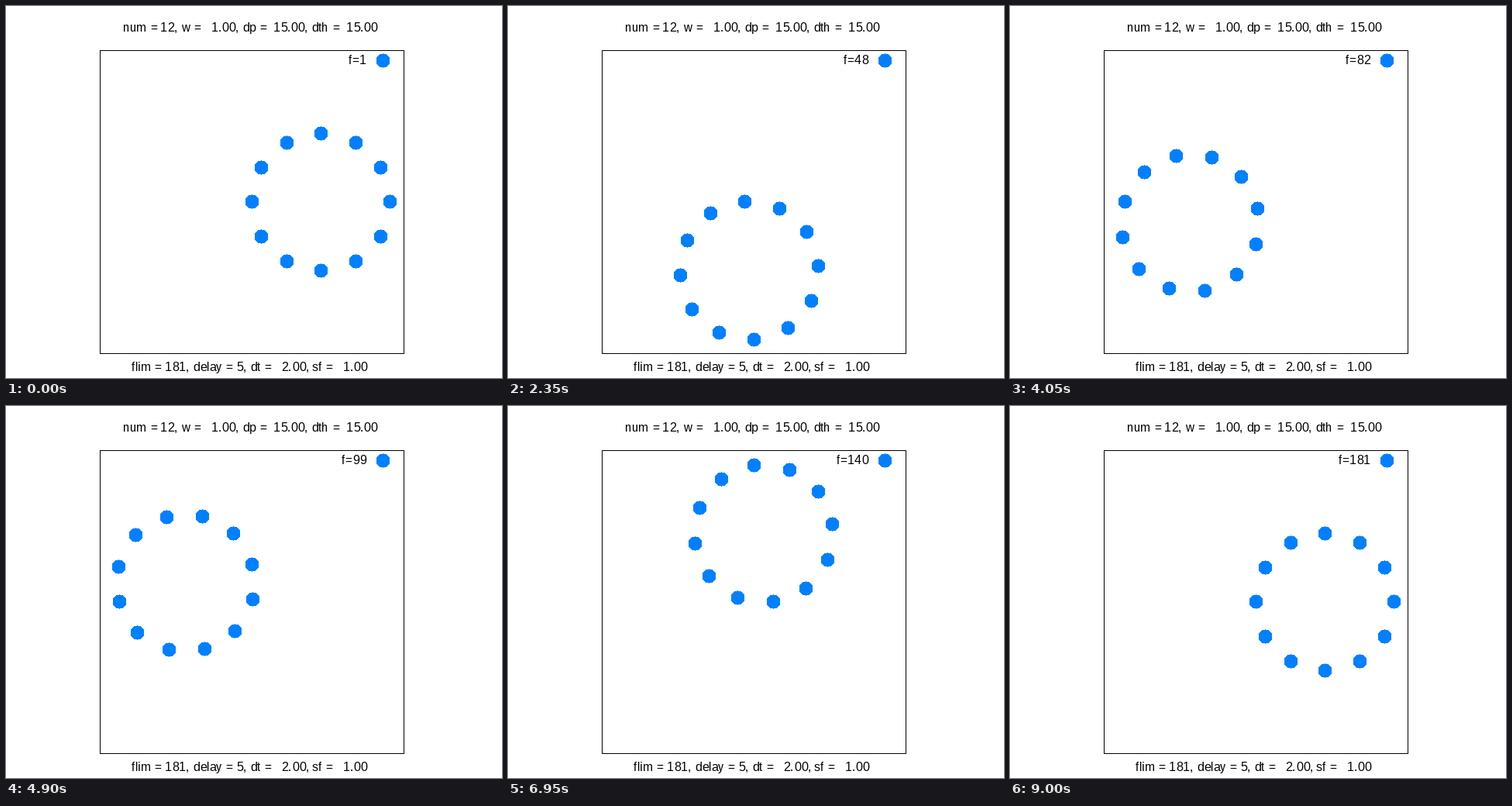
A matplotlib script that plays this animation: 640x480 px, repeating every 9.05 s.

```python
import math

import numpy as np
import matplotlib.pyplot as plt
from matplotlib.animation import FuncAnimation
from matplotlib.collections import PolyCollection
from matplotlib.patches import Rectangle
from matplotlib.textpath import text_to_path

W, H, DPI = 640, 480, 100
FRAMES, DELAY = 181, 50
NUM, STEP = 12, 2.0
BLUE = "#0080ff"
FONT_PX = 16
LEFT, TOP, RIGHT, BOTTOM = 121, 57, 513, 448
SPAN = 4.4  # data units across the box
TEXT_RIGHT = 464.5

# crisp, fully hinted glyphs
plt.rcParams["text.hinting"] = "default"
plt.rcParams["text.hinting_factor"] = 1

fig = plt.figure(figsize=(W / DPI, H / DPI), dpi=DPI, facecolor="white")
ax = fig.add_axes([0, 0, 1, 1])
ax.set_xlim(0, W)
ax.set_ylim(H, 0)
ax.axis("off")


def disc_outline(r=9):
    """Stair-stepped outline of a small aliased disc around pixel (0, 0)."""
    right, left = [], []
    for row in range(-r, r + 1):
        half = min(r - 1, math.isqrt(r * r - row * row))
        right += [(half + 1, row), (half + 1, row + 1)]
        left += [(-half, row), (-half, row + 1)]
    return np.array(right + left[::-1], float)


def glyph(baseline, char=""):
    return ax.text(0, baseline, char, family="Liberation Sans", color="black",
                   fontsize=FONT_PX * 72 / DPI, ha="left", va="baseline")


PROP = glyph(0).get_fontproperties()


def advance(s):
    """Unhinted pen advance of a string in pixels."""
    def width(t):
        return text_to_path.get_text_width_height_descent(t, PROP, False)[0]
    return (width("|" + s + "|") - width("||")) * DPI / 72


def place(glyphs, x, s):
    """Set one character per glyph, each on a whole pixel."""
    for k, g in enumerate(glyphs):
        g.set_text(s[k:k + 1])
        g.set_x(round(x + advance(s[:k])))


def label(x, baseline, s):
    place([glyph(baseline) for _ in s], x, s)


def to_pixels(u, v):
    """Data coordinates (v upwards) to whole pixels."""
    x = (LEFT + RIGHT) / 2 + u * (RIGHT - LEFT) / SPAN
    y = H - 1 - (TOP + BOTTOM) / 2 + v * (BOTTOM - TOP) / SPAN
    return np.column_stack([np.floor(x + 0.5 + 1e-6),
                            H - 1 - np.floor(y + 0.505)])


DISC = disc_outline()
KEY_DOT = np.array([[486, 70]])
SPOKES = np.arange(NUM) * 2 * np.pi / NUM

ax.add_patch(Rectangle((LEFT + 0.5, TOP + 0.5), RIGHT - LEFT, BOTTOM - TOP,
                       fill=False, edgecolor="black", linewidth=72 / DPI,
                       antialiased=False, snap=False))
label(150, 33, "num = 12, w =   1.00, dp =  15.00, dth =  15.00")
label(162, 471, "flim = 181, delay = 5, dt =   2.00, sf =   1.00")
counter = [glyph(75) for _ in range(5)]

dots = PolyCollection([DISC], facecolors=BLUE, edgecolors="none",
                      linewidths=0, antialiaseds=False, zorder=3)
dots.set_snap(False)
ax.add_collection(dots, autolim=False)


def update(i):
    # the ring travels clockwise while it spins the other way
    a = math.radians(STEP * i)
    u = math.cos(a) + np.cos(SPOKES + a)
    v = -math.sin(a) + np.sin(SPOKES + a)
    centres = np.vstack([to_pixels(u, v), KEY_DOT])
    dots.set_verts([DISC + c for c in centres])

    s = f"f={i + 1}"
    place(counter, TEXT_RIGHT - advance(s), s)
    return [dots, *counter]


anim = FuncAnimation(fig, update, frames=FRAMES, interval=DELAY,
                     init_func=lambda: update(0), repeat=True,
                     repeat_delay=0, blit=False)
plt.show()
```
